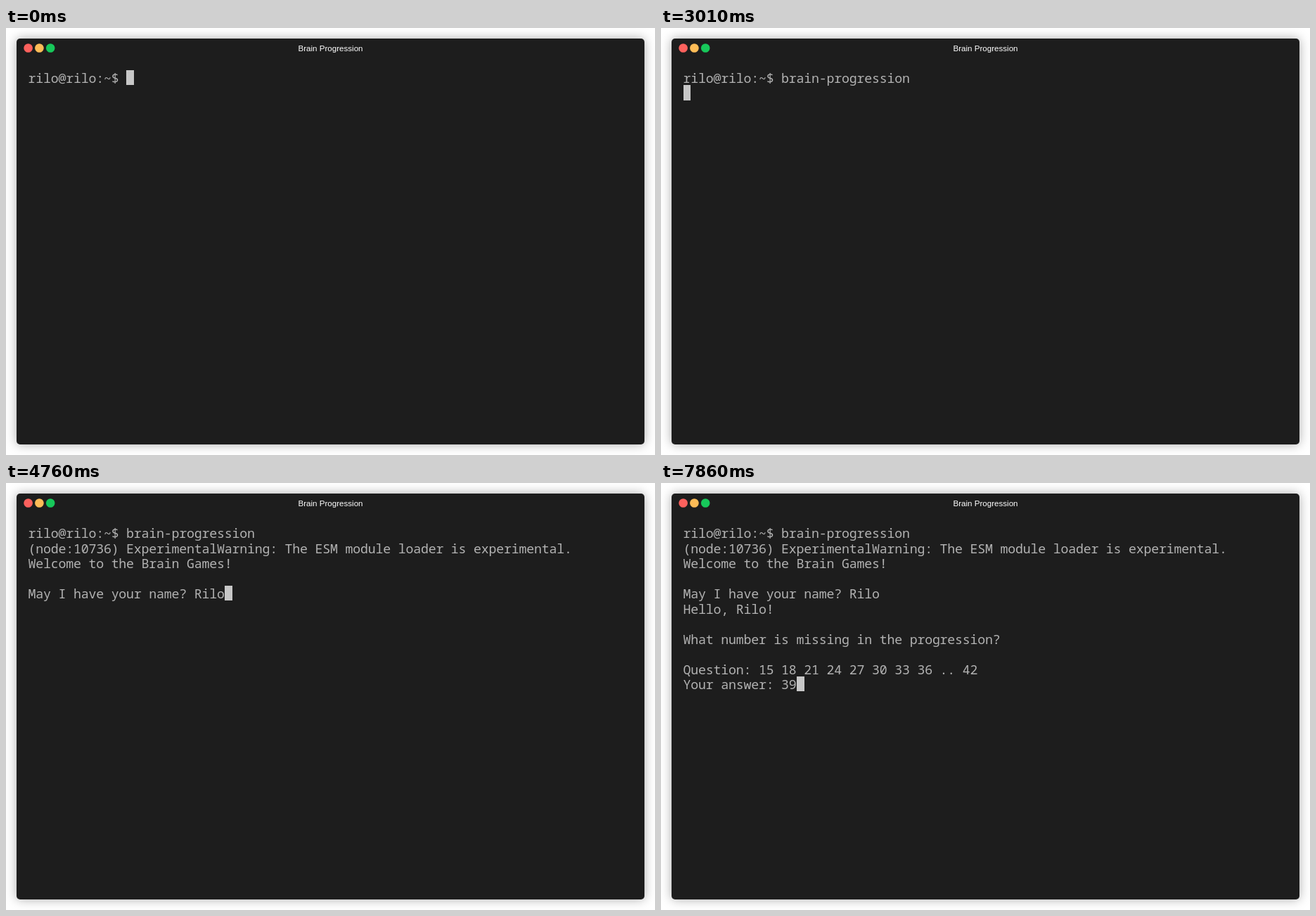
An HTML page that plays this animation: 923 px wide and 607 px high, repeating every 8 s.

```html
<!DOCTYPE html>
<html lang="en">
<head>
<meta charset="utf-8">
<title>Brain Progression</title>
<style>
  html, body { margin: 0; width: 100%; height: 100%; overflow: hidden; background: #fff; }
  #window {
    position: absolute; left: 15px; top: 15px; width: 893px; height: 577px;
    border-radius: 5px; background: #1d1d1d; box-shadow: 0 0 15px #aaa;
  }
  #title {
    position: absolute; left: 0; right: 0; top: 4px; line-height: 20px;
    text-align: center; color: #fff; font-size: 11.6px;
    font-family: "Liberation Sans", Arial, sans-serif;
  }
  svg { position: absolute; left: 0; top: 0; }
  #screen { position: absolute; left: 16.5px; top: 44.5px; }
  #text {
    position: relative; top: 0.6px; margin: 0; color: #b2b2b2;
    font: 18.3px/21.5px "Noto Sans Mono", monospace;
    letter-spacing: calc(10.75px - 0.6em);
    font-variant-ligatures: none;
  }
  #cursor { position: absolute; width: 10.75px; height: 21.5px; background: #c7c7c7; }
</style>
</head>
<body>
<div id="window">
  <svg width="70" height="28">
    <circle cx="16.6" cy="13.5" r="6.3" fill="#fc615d"/>
    <circle cx="32.4" cy="13.5" r="6.3" fill="#fdbc57"/>
    <circle cx="48.2" cy="13.5" r="6.3" fill="#17c85a"/>
  </svg>
  <div id="title">Brain Progression</div>
  <div id="screen"><pre id="text"></pre><div id="cursor"></div></div>
</div>
<script>
const LOOP = 8000, CELL = 10.75, ROW = 21.5;
const textBox = document.getElementById("text");
const cursor = document.getElementById("cursor");

// Each entry appends output to the terminal at the given time in ms.
const output = [
  [0, "rilo@rilo:~$ "],
  [880, "b"], [1080, "r"], [1210, "a"], [1420, "in-"],
  [2370, "p"], [2550, "rogression "], [3010, "\n"],
  [3040, "(node:10736) ExperimentalWarning: The ESM module loader is experimental.\n"],
  [3060, "Welcome to the Brain Games!\n\nMay I have your name? "],
  [4190, "R"], [4510, "i"], [4610, "l"], [4760, "o"],
  [4940, "\nHello, Rilo!\n\nWhat number is missing in the progression?\n\n" +
         "Question: 15 18 21 24 27 30 33 36 .. 42\nYour answer: "],
  [6940, "3"], [7860, "9"]
];

let shown;
function draw() {
  const time = performance.now() % LOOP;
  const text = output.filter(([at]) => at <= time).map(([, part]) => part).join("");
  if (text !== shown) {
    shown = text;
    const lines = text.split("\n");
    textBox.textContent = text;
    cursor.style.left = lines.at(-1).length * CELL + "px";
    cursor.style.top = (lines.length - 1) * ROW + "px";
  }
  requestAnimationFrame(draw);
}
draw();
</script>
</body>
</html>
```
